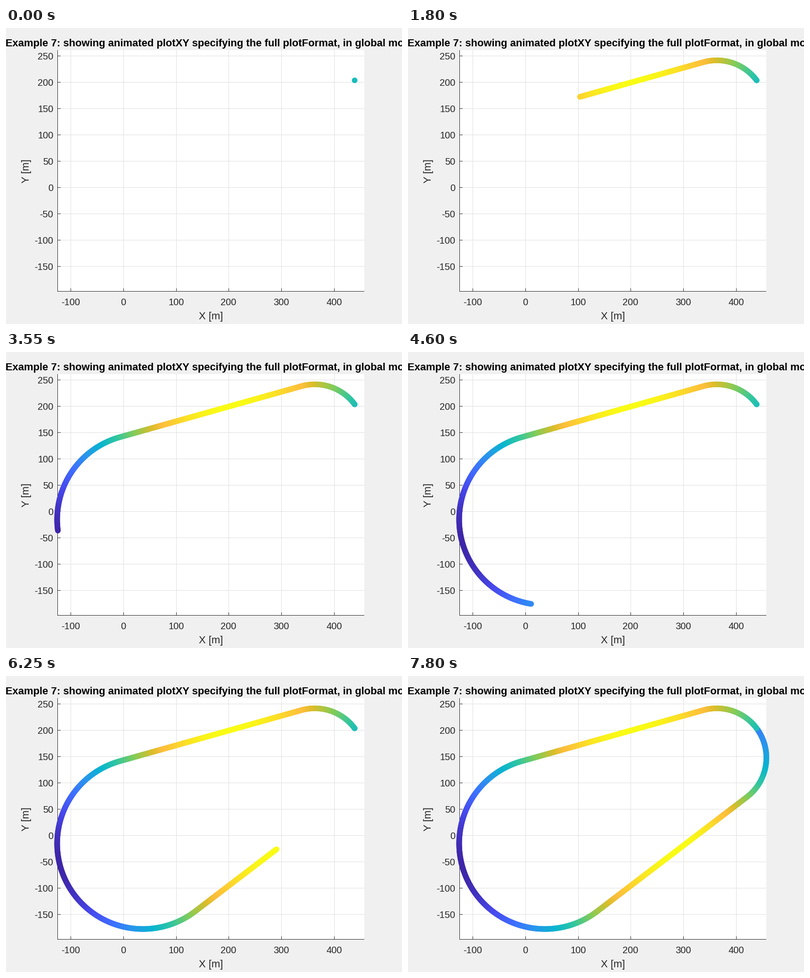
Animation of 840 by 630 pixels, one loop 7850 ms. Source, as a matplotlib script:

```python
import numpy as np
import matplotlib.pyplot as plt
from matplotlib.animation import FuncAnimation
from matplotlib.collections import LineCollection
from matplotlib.colors import LinearSegmentedColormap
from matplotlib.patches import Rectangle

W, H, DPI = 840, 630, 100
FRAMES, STEP_MS = 157, 50
SUB = 4  # track pieces drawn per frame
INK, GRID = "#262626", "#dfdfdf"
LEFT, RIGHT, TOP, BOTTOM = 109.5, 760, 47, 560.5
SCALE, X0, Y0 = 1.118, 249.3, 339.4  # pixels per metre, pixel of (0, 0)

# the lap is a belt around two circles
BIG, BIG_R = np.array([290.5, 356.5]), 182
SMALL, SMALL_R = np.array([655, 174]), 105.2
START, GAP = np.radians(-36.5), np.radians(1.5)

# turning points of the colour level: (frame, level)
EXTREMA = [(-26, -.02), (26, 1), (73, 0), (125, 1), (160, .25)]

STOPS = list(zip(np.linspace(0, 1, 10), [
    "#3e26a8", "#4747eb", "#3e6fff", "#2797eb", "#08b5d0",
    "#31c69f", "#81cc59", "#dcbd29", "#fccf30", "#f9fb15"]))
STOPS.insert(8, (.83, "#febe3c"))
PARULA = LinearSegmentedColormap.from_list("parula", STOPS)


def arc(center, r, a, b):
    t = np.linspace(a, b, 400)
    return center + r * np.column_stack([np.cos(t), np.sin(t)])


def build_track(n):
    """n points evenly spaced along the lap."""
    d = SMALL - BIG
    phi = np.arctan2(d[1], d[0])
    lean = np.arcsin((BIG_R - SMALL_R) / np.hypot(*d))
    upper, lower = phi + lean - np.pi / 2, phi - lean + np.pi / 2
    path = np.concatenate([
        arc(SMALL, SMALL_R, START, upper),
        arc(BIG, BIG_R, upper, lower - 2 * np.pi),
        arc(SMALL, SMALL_R, lower, START + GAP),
    ])
    s = np.r_[0, np.cumsum(np.hypot(*np.diff(path, axis=0).T))]
    even = np.linspace(0, s[-1], n)
    return np.column_stack([np.interp(even, s, c) for c in path.T])


def level(k):
    """Colour level at frame k, easing like a cosine between extrema."""
    t, v = np.array(EXTREMA).T
    i = np.searchsorted(t, k, side="right") - 1
    u = (k - t[i]) / (t[i + 1] - t[i])
    return v[i] + (v[i + 1] - v[i]) * (1 - np.cos(np.pi * u)) / 2


def px(v):
    return v * 72 / DPI


def crisp(v):
    return np.floor(v) + .5


def stroke(xs, ys, color=INK):
    ax.plot(xs, ys, color=color, lw=px(1), solid_capstyle="butt",
            snap=False, zorder=2)


def label(x, y, text, size, color=INK, ha="center", **kw):
    ax.text(x, y, text, fontsize=px(size), color=color, ha=ha,
            family="Liberation Sans", va="baseline", **kw)


fig = plt.figure(figsize=(W / DPI, H / DPI), dpi=DPI, facecolor="#f0f0f0")
ax = fig.add_axes([0, 0, 1, 1])
ax.set(xlim=(0, W), ylim=(H, 0))
ax.axis("off")
ax.add_patch(Rectangle((LEFT, TOP), RIGHT - LEFT, BOTTOM - TOP, fc="white", lw=0))

x_ticks = [(v, crisp(X0 + SCALE * v)) for v in range(-100, 401, 100)]
y_ticks = [(v, crisp(Y0 - SCALE * v)) for v in range(-150, 251, 50)]
for _, x in x_ticks:
    stroke([x, x], [TOP, BOTTOM], GRID)
for _, y in y_ticks:
    stroke([LEFT, RIGHT], [y, y], GRID)
for v, x in x_ticks:
    stroke([x, x], [BOTTOM, BOTTOM - 6.5])
    label(x - .5, 590, str(v), 20)
for v, y in y_ticks:
    stroke([LEFT, LEFT + 6.5], [y, y])
    label(100.5, y + 7.5, str(v), 20, ha="right")
stroke([LEFT, LEFT], [TOP, BOTTOM + .5])
stroke([LEFT - .5, RIGHT], [BOTTOM, BOTTOM])

label(434.5, 620, "X [m]", 22)
label(49, 304, "Y [m]", 22, rotation=90, rotation_mode="anchor")
label(434.5, 39, "Example 7: showing animated plotXY specifying the full "
      "plotFormat, in global mode", 22, "black", weight="bold")

points = build_track((FRAMES - 1) * SUB + 1)
levels = level(np.arange(len(points)) / SUB)
colors = PARULA(levels)
dot = np.array([[points[0], points[0] + .01]])
pieces = np.concatenate([dot, np.stack([points[:-1], points[1:]], axis=1)])
track = LineCollection([], linewidths=px(12), capstyle="round",
                       snap=False, zorder=3)
ax.add_collection(track)


def draw(k):
    # higher levels lie on top
    order = np.argsort(levels[:k * SUB + 1], kind="stable")
    track.set_segments(pieces[order])
    track.set_color(colors[order])
    return [track]


anim = FuncAnimation(fig, draw, frames=FRAMES, interval=STEP_MS,
                     repeat=True, repeat_delay=0, blit=False)
plt.show()
```
